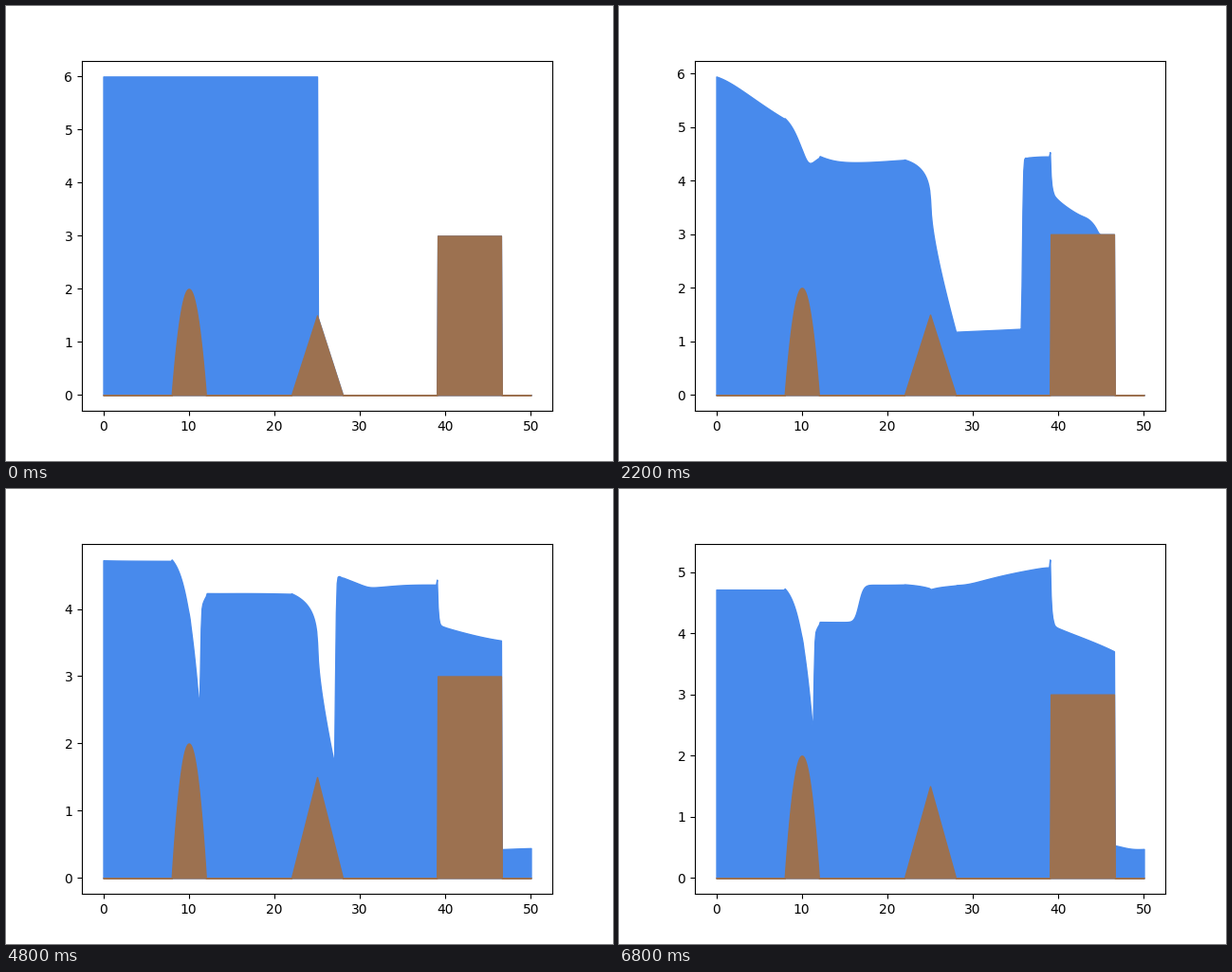
A matplotlib script that plays this animation: 640 px wide and 480 px high, repeating every 6900 ms.

```python
import numpy as np
import matplotlib.pyplot as plt
from matplotlib.animation import FuncAnimation

# Dam break over uneven ground: shallow water equations, first-order
# finite volumes with hydrostatic reconstruction and Manning friction.
G = 9.81
MANNING = 0.025
CFL = 0.5
DRY = 1e-6
FRAMES, INTERVAL = 69, 100
T_END = 10.0
WATER, GROUND = "#488aec", "#9c7150"

x = np.linspace(0, 50, 501)
dx = x[1] - x[0]


def terrain(x):
    hill = np.maximum(0, 2 - 0.5 * (x - 10) ** 2)
    ridge = np.maximum(0, 1.5 - 0.5 * np.abs(x - 25))
    block = np.where((x > 39.05) & (x < 46.55), 3.0, 0.0)
    return hill + ridge + block


def velocity(h, q):
    return np.where(h > DRY, q / np.maximum(h, DRY), 0.0)


def hll(hl, ul, hr, ur):
    cl, cr = np.sqrt(G * hl), np.sqrt(G * hr)
    sl = np.minimum(0, np.minimum(ul - cl, ur - cr))
    sr = np.maximum(0, np.maximum(ul + cl, ur + cr))
    span = np.maximum(sr - sl, 1e-12)
    ql, qr = hl * ul, hr * ur

    def mix(fl, fr, jump):
        return (sr * fl - sl * fr + sl * sr * jump) / span

    mass = mix(ql, qr, hr - hl)
    momentum = mix(ql * ul + G * hl ** 2 / 2, qr * ur + G * hr ** 2 / 2, qr - ql)
    return mass, momentum


def pad(a):
    return np.concatenate((a[:1], a, a[-1:]))


def step(h, q, z, dt):
    hp, up, zp = pad(h), pad(velocity(h, q)), pad(z)
    top = np.maximum(zp[:-1], zp[1:])
    hl = np.maximum(0, hp[:-1] + zp[:-1] - top)
    hr = np.maximum(0, hp[1:] + zp[1:] - top)
    mass, mom = hll(hl, up[:-1], hr, up[1:])
    mom_l = mom + G / 2 * (hp[:-1] ** 2 - hl ** 2)
    mom_r = mom + G / 2 * (hp[1:] ** 2 - hr ** 2)

    h = np.maximum(0, h - dt / dx * (mass[1:] - mass[:-1]))
    q = q - dt / dx * (mom_l[1:] - mom_r[:-1])
    wet = h > DRY
    drag = G * MANNING ** 2 * np.abs(velocity(h, q)) / np.maximum(h, DRY) ** (4 / 3)
    return h, np.where(wet, q / (1 + dt * drag), 0.0)


def simulate():
    h = np.where(x < 25.05, 6 - z, 0.0)
    q = np.zeros_like(x)
    t = 0.0
    surfaces = []
    for goal in np.linspace(0, T_END, FRAMES):
        while goal - t > 1e-9:
            speed = np.max(np.abs(velocity(h, q)) + np.sqrt(G * h))
            dt = min(CFL * dx / speed, goal - t)
            h, q = step(h, q, z, dt)
            t += dt
        surfaces.append(h + z)
    return surfaces


z = terrain(x)
surfaces = simulate()

fig, ax = plt.subplots(figsize=(6.4, 4.8), dpi=100)


def draw(i):
    ax.clear()
    ax.fill_between(x, surfaces[i], color=WATER)
    ax.fill_between(x, z, color=GROUND)


anim = FuncAnimation(fig, draw, frames=FRAMES, init_func=lambda: draw(0),
                     interval=INTERVAL, repeat=True, repeat_delay=0)
plt.show()
```
